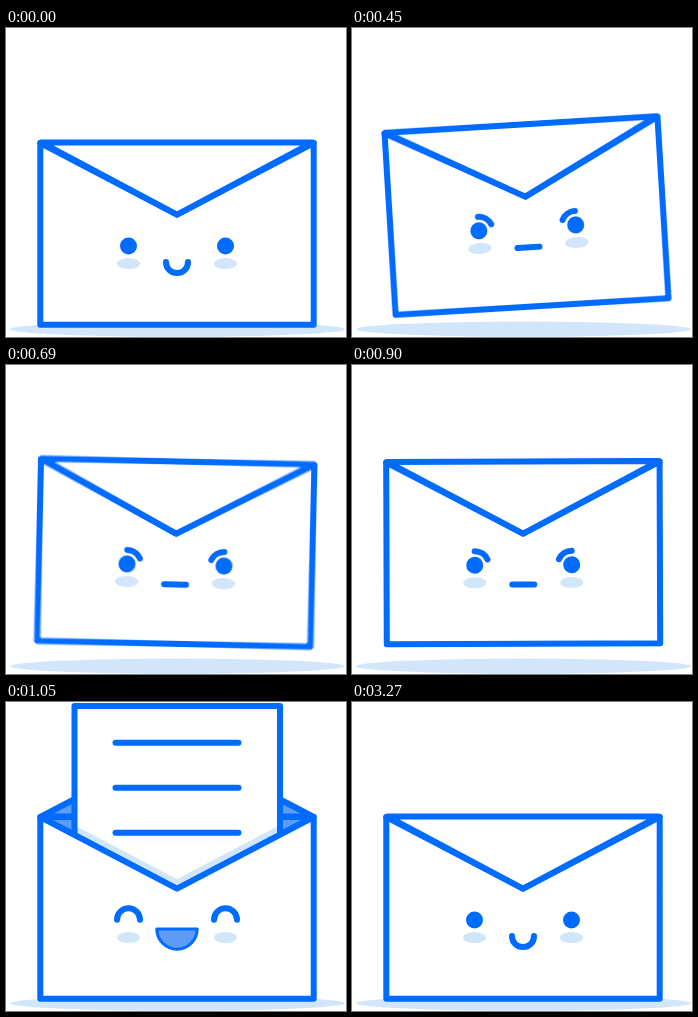
These frames come from a looping animation (340x309 px, 3.6 s). An HTML page with a canvas:

```html
<!DOCTYPE html>
<html lang="en">
<head>
<meta charset="utf-8">
<title>Envelope</title>
<style>
html, body { margin: 0; width: 100%; height: 100%; overflow: hidden; background: #fff; }
canvas { display: block; }
</style>
</head>
<body>
<canvas id="stage" width="340" height="309"></canvas>
<script>
const W = 340, H = 309, LOOP = 3600, STEP = 30, SHUTTER = 15, SAMPLES = 8;
const BLUE = '#006bff', MID = '#5e9bf6', PALE = '#d1e6fa', WHITE = '#fff';
const CX = 171, LEFT = 34.3, RIGHT = 307.7, TOP = 115, BOTTOM = 296.8, TIP = 186.7;

const out = document.getElementById('stage').getContext('2d');
const layer = document.createElement('canvas');
layer.width = W;
layer.height = H;
const g = layer.getContext('2d');

// Progress of t between a and b, clamped to 0..1
const span = (t, a, b) => Math.min(1, Math.max(0, (t - a) / (b - a)));
const smooth = u => u * u * (3 - 2 * u);
const easeOut = u => 1 - (1 - u) * (1 - u);
const pulse = (t, a, b, c, d) => smooth(span(t, a, b)) - smooth(span(t, c, d));

const SHAKE = [[330, 0], [450, -3.7], [540, 3.7], [630, -3.7], [720, 3.7], [900, -0.2], [930, 0]];

function tilt(t) {
  for (let i = 1; i < SHAKE.length; i++) {
    const [t0, a] = SHAKE[i - 1], [t1, b] = SHAKE[i];
    if (t < t1) {
      const u = span(t, t0, t1);
      return a + (b - a) * (i > 4 ? smooth(u) : u);
    }
  }
  return 0;
}

function pose(t) {
  return {
    lift: 18 * (smooth(span(t, 250, 375)) - span(t, 908, 980) ** 2),
    tilt: tilt(t) * Math.PI / 180,
    angry: pulse(t, 255, 370, 908, 970),
    happy: pulse(t, 930, 1030, 3140, 3250),
    flap: 1 - 2 * pulse(t, 912, 1000, 3190, 3262),
    paper: easeOut(span(t, 945, 1042)) - span(t, 3120, 3237),
    shade: span(t, 960, 1040) - span(t, 3118, 3150)
  };
}

function stroke(color = BLUE, width = 6) {
  g.strokeStyle = color;
  g.lineWidth = width;
  g.stroke();
}

function fill(color) {
  g.fillStyle = color;
  g.fill();
}

function path(points, close) {
  g.beginPath();
  points.forEach(p => g.lineTo(...p));
  if (close) g.closePath();
}

function oval(x, y, rx, ry, color) {
  g.beginPath();
  g.ellipse(x, y, rx, ry, 0, 0, Math.PI * 2);
  fill(color);
}

function arc(x, y, r, from, to) {
  g.beginPath();
  g.arc(x, y, r, from, to);
}

function drawFlap(s) {
  path([[LEFT + 1, TOP - 0.5], [CX, TOP + (TIP - TOP) * s], [RIGHT - 1, TOP - 0.5]], true);
  fill(s > 0 ? WHITE : MID);
  stroke();
}

function drawPaper(amount, shade) {
  const x = 68.5, w = 205.5, y = 4 + 115 * (1 - amount);
  g.beginPath();
  g.rect(x, y, w, 230 - y);
  fill(WHITE);
  if (shade > 0) {
    g.save();
    g.clip();
    g.globalAlpha = shade;
    g.lineJoin = 'miter';
    path([[LEFT, TOP], [CX, TIP], [RIGHT, TOP]]);
    stroke(PALE, 17);
    g.restore();
  }
  g.beginPath();
  g.rect(x, y, w, 230 - y);
  stroke();
  for (let i = 0; i < 3; i++) {
    const ly = y + 36.7 + i * 45;
    path([[109.5, ly], [232.5, ly]]);
    stroke();
  }
}

function drawFront() {
  path([[LEFT, TOP], [CX, TIP], [RIGHT, TOP], [RIGHT, BOTTOM], [LEFT, BOTTOM]], true);
  fill(WHITE);
  stroke();
}

// Left eye; the right one is its mirror image
function drawEye({ angry, happy }) {
  const x = 122.5, up = -Math.PI / 2;
  oval(x, 235.6, 11.6, 5.5, PALE);
  if (happy < 1) oval(x, 218, 8.5 * (1 - happy), 8.5 * (1 - happy), BLUE);
  if (angry > 0.02) {
    arc(x, 218, 14, up, up + 1.15 * angry);
    stroke();
  }
  if (happy > 0.02) {
    arc(x, 217.7, 11.5, up * (1 + happy), up * (1 - happy));
    stroke();
  }
}

function drawMouth({ angry, happy }) {
  if (happy < 0.4) {
    const y = 234 + 3.5 * angry, dip = y + 14.67 * (1 - angry);
    g.beginPath();
    g.moveTo(160, y);
    g.bezierCurveTo(160, dip, 182, dip, 182, y);
    stroke();
  } else {
    arc(CX, 227, 20.2 * happy, 0, Math.PI);
    g.closePath();
    fill(MID);
    stroke(BLUE, 3);
  }
}

function drawFace(p) {
  drawEye(p);
  g.save();
  g.translate(CX * 2, 0);
  g.scale(-1, 1);
  drawEye(p);
  g.restore();
  drawMouth(p);
}

function drawScene(t) {
  const p = pose(t);
  g.fillStyle = WHITE;
  g.fillRect(0, 0, W, H);
  oval(171.5, 301.2, 167.5, 7.6, PALE);

  g.save();
  g.lineCap = g.lineJoin = 'round';
  g.translate(CX, 148 - p.lift);
  g.rotate(p.tilt);
  g.translate(-CX, -148);
  if (p.flap <= 0) drawFlap(p.flap);
  path([[LEFT, TOP], [RIGHT, TOP], [CX, TIP]], true);
  fill(MID);
  stroke();
  if (p.paper > 0) drawPaper(p.paper, p.shade);
  drawFront();
  if (p.flap > 0) drawFlap(p.flap);
  drawFace(p);
  g.restore();
}

// Average several moments inside the shutter for motion blur
function render(t) {
  const still = t < 250 || (t >= 1050 && t < 3120) || t >= 3270;
  const n = still ? 1 : SAMPLES;
  for (let i = 0; i < n; i++) {
    drawScene(t + SHUTTER * ((i + 0.5) / n - 0.5));
    out.globalAlpha = 1 / (i + 1);
    out.drawImage(layer, 0, 0);
  }
}

const start = performance.now();
let shown = -1;

function tick() {
  const elapsed = (performance.now() - start) % LOOP;
  const t = Math.floor(elapsed / STEP) * STEP;
  if (t !== shown) render(shown = t);
  requestAnimationFrame(tick);
}
tick();
</script>
</body>
</html>
```
